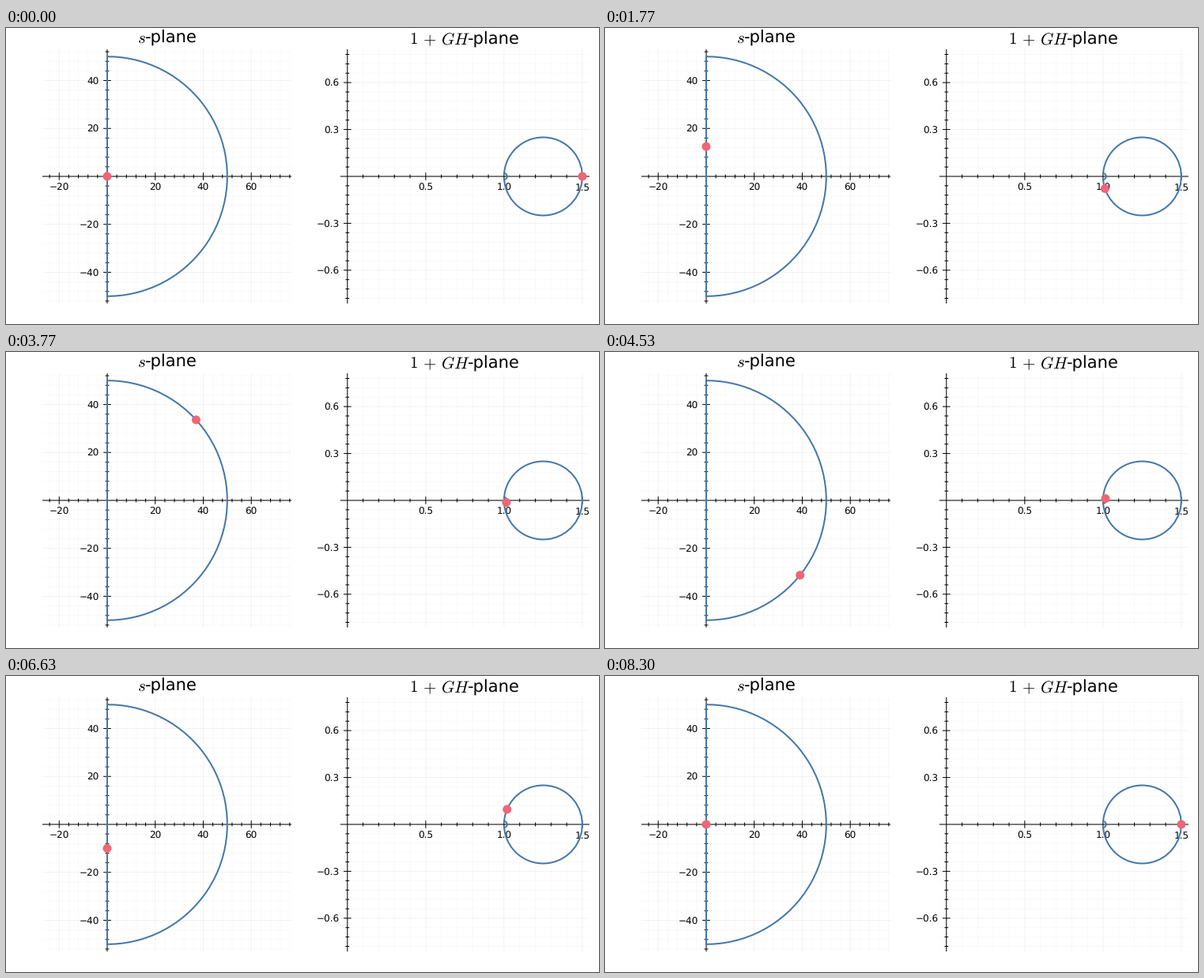
Recreate the animation shown at these times as a matplotlib script. Size 750 by 375 pixels, loop 8330 ms.

```python
import numpy as np
import matplotlib.pyplot as plt
from matplotlib.animation import FuncAnimation
from matplotlib.patches import Circle

W, H, DPI = 750, 375, 100
PT = 72 / DPI  # points per pixel
BLUE, RED = "#4477AA", "#EE6677"
TOP, BOTTOM, ZERO_Y = 27, 349, 188
STEPS = 50
LOOP_MS = 8330

plt.rcParams.update({
    "font.family": "DejaVu Sans",
    "mathtext.fontset": "cm",
    "text.hinting": "none",
})

fig = plt.figure(figsize=(W / DPI, H / DPI), dpi=DPI, facecolor="white")
ax = fig.add_axes([0, 0, 1, 1])
ax.set_xlim(0, W)
ax.set_ylim(H, 0)
ax.axis("off")


def contour():
    """Closed path around the right half plane, five equal-time legs."""
    arc = 50 * np.exp(1j * np.linspace(np.pi / 2, -np.pi / 2, STEPS))
    legs = [
        1j * np.linspace(0, 10, STEPS),
        1j * np.linspace(10, 50, STEPS),
        arc,
        1j * np.linspace(-50, -10, STEPS),
        1j * np.linspace(-10, 0, STEPS),
    ]
    return np.concatenate(legs)


def label(x, y, text, size, ha):
    ax.text(x, y, text, fontsize=size * PT, ha=ha, va="baseline",
            color="black", zorder=4)


def number(v, digits):
    return f"{v:.{digits}f}".replace("-", "\u2212")


def line(xs, ys, alpha=1, zorder=2):
    ax.plot(xs, ys, color="black", lw=PT, alpha=alpha, zorder=zorder,
            solid_capstyle="butt", snap=False)


class Plane:
    """Plot panel with axes through the origin, drawn in pixels."""

    def __init__(self, left, right, x0, scale):
        self.left, self.right = left, right
        self.x0, self.scale = x0, scale

    def to_px(self, z):
        return self.x0 + z.real * self.scale, ZERO_Y - z.imag * self.scale

    def ticks(self, step, horizontal):
        """Yield index, pixel offset, tick half length and grid opacity."""
        if horizontal:
            lo, hi = self.left - self.x0, self.right - self.x0
        else:
            lo, hi = ZERO_Y - BOTTOM, ZERO_Y - TOP
        unit = step / 5 * self.scale
        for k in range(int(np.ceil(lo / unit)), int(np.floor(hi / unit)) + 1):
            major = k % 5 == 0
            yield k, k * unit, 4.8 if major else 2.4, 0.05 if major else 0.025

    def draw_axes(self, x_step, y_step, digits):
        for k, dx, d, alpha in self.ticks(x_step, True):
            x = self.x0 + dx
            line([x, x], [TOP, BOTTOM], alpha, 1)
            if k:
                line([x, x], [ZERO_Y - d, ZERO_Y + d])
            if k and k % 5 == 0:
                label(x, 205.4, number(k // 5 * x_step, digits), 12, "center")

        for k, dy, d, alpha in self.ticks(y_step, False):
            y = ZERO_Y - dy
            line([self.left, self.right], [y, y], alpha, 1)
            if k:
                line([self.x0 - d, self.x0 + d], [y, y])
            if k and k % 5 == 0:
                label(self.x0 - 10.3, y + 4.9, number(k // 5 * y_step, digits),
                      12, "right")

        line([self.left, self.right], [ZERO_Y, ZERO_Y])
        line([self.x0, self.x0], [TOP, BOTTOM])

    def draw_path(self, z):
        self.path = np.column_stack(self.to_px(z))
        ax.plot(*self.path.T, color=BLUE, lw=2 * PT, solid_joinstyle="round",
                zorder=5, snap=False)
        self.dot = ax.add_patch(Circle(self.path[0], 5.5, fc=RED, ec="none",
                                       zorder=6))


def title(math, x_math, x_text, y):
    label(x_math, y, f"${math}$", 21, "left")
    label(x_text, y, "-plane", 21, "left")


s = contour()
s_plane = Plane(46, 361, 128, 3.037)
s_plane.draw_axes(20, 20, 0)
s_plane.draw_path(s)
title("s", 166, 176, 19)

gh_plane = Plane(422.9, 737.9, 431.8, 198.1)
gh_plane.draw_axes(0.5, 0.3, 1)
gh_plane.draw_path(1 + 1 / (s + 2))
title(r"1\,+\,GH", 510.5, 584, 21)

planes = (s_plane, gh_plane)


def update(i):
    for p in planes:
        p.dot.center = tuple(p.path[i])
    return [p.dot for p in planes]


anim = FuncAnimation(fig, update, frames=len(s), interval=LOOP_MS / len(s),
                     repeat=True, repeat_delay=0, blit=False)
plt.show()
```
